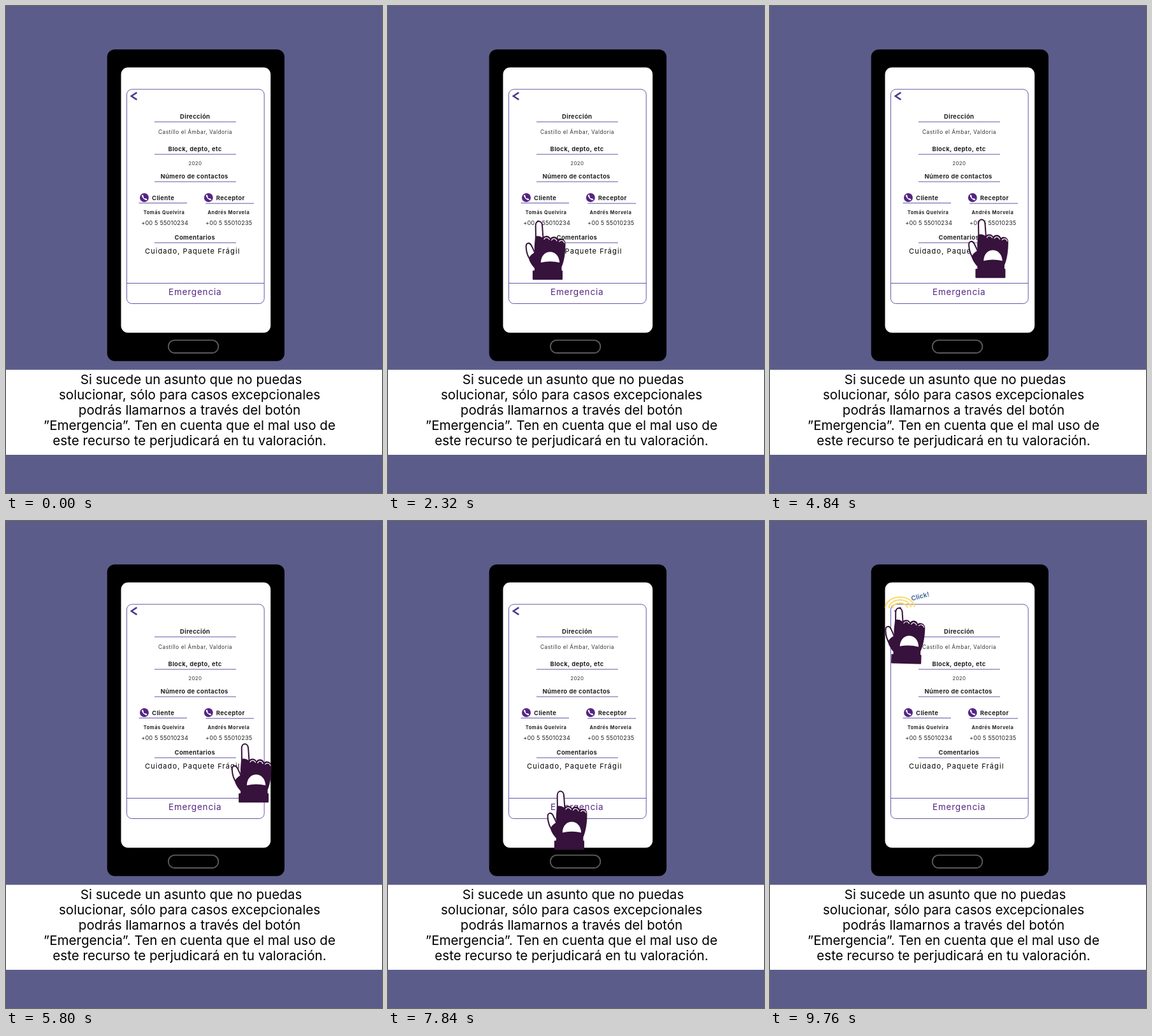
An HTML page with a canvas for the animation above (10000 ms loop, 590 by 765 pixels).

```html
<!DOCTYPE html>
<html lang="es">
<head>
<meta charset="utf-8">
<title>Botón de emergencia</title>
<style>
html, body { margin: 0; width: 100%; height: 100%; overflow: hidden; background: #5b5c8a; }
canvas { display: block; }
</style>
</head>
<body>
<canvas id="stage" width="590" height="765"></canvas>
<script>
const ctx = document.getElementById('stage').getContext('2d');
const LOOP = 10000, STEP = 40, TAP = 9480;
const DARK = '#37123c', LINE = '#6456a6', PURPLE = '#552583', INK = '#222';

// Each stroke passes its points at even intervals and starts and ends at rest
const strokes = [
  { from: 40, to: 1920, points: [[590, 396], [360, 345], [231, 309], [228, 318], [226, 331]] },
  { from: 2120, to: 4080, points: [[226, 331], [197, 349], [221, 352], [262, 344], [330, 311]] },
  { from: 4320, to: 5240, points: [[330, 311], [298, 350]] },
  { from: 5300, to: 8640, points: [[298, 350], [364, 349], [220, 393], [315, 402], [242, 430], [310, 469]] },
  { from: 8680, to: TAP, points: [[310, 469], [181, 147]] },
  { from: TAP, to: 9760, points: [[181, 147], [180, 131]] }
];

const clamp = (v) => Math.min(1, Math.max(0, v));

// Flat at turning points, so the curve never overshoots a point
function slope(before, here, after) {
  const a = here - before, b = after - here;
  return a * b <= 0 ? 0 : 2 * a * b / (a + b);
}

function handAt(t) {
  const { from, to, points } = strokes.findLast(s => t >= s.from);
  const last = points.length - 1;
  const pos = clamp((t - from) / (to - from)) * last;
  const i = Math.min(last - 1, Math.floor(pos));
  const u = pos - i;
  const point = (k) => points[Math.min(last, Math.max(0, k))];
  return [0, 1].map(axis => {
    const [o, p, q, r] = [-1, 0, 1, 2].map(k => point(i + k)[axis]);
    return p + (q - p) * u * u * (3 - 2 * u)
      + u * (1 - u) * ((1 - u) * slope(o, p, q) - u * slope(p, q, r));
  });
}

function box(x, y, w, h, r, fill, stroke, width = 1) {
  ctx.beginPath();
  ctx.roundRect(x, y, w, h, r);
  if (fill) { ctx.fillStyle = fill; ctx.fill(); }
  if (stroke) { ctx.strokeStyle = stroke; ctx.lineWidth = width; ctx.stroke(); }
}

function rule(x1, x2, y) {
  ctx.fillStyle = LINE;
  ctx.fillRect(x1, y, x2 - x1, 1);
}

function label(text, x, y, size, weight = 400, spacing = 0, color = INK) {
  ctx.font = `${weight} ${size}px Inter, sans-serif`;
  ctx.letterSpacing = spacing + 'px';
  ctx.fillStyle = color;
  ctx.fillText(text, x, y);
}

const heading = (text, x, y) => label(text, x, y, 9.5, 700, 0.35);

function shape(d, fill, stroke, width) {
  const p = new Path2D(d);
  if (fill) { ctx.fillStyle = fill; ctx.fill(p); }
  if (stroke) { ctx.strokeStyle = stroke; ctx.lineWidth = width; ctx.stroke(p); }
}

function callIcon(x, y) {
  ctx.save();
  ctx.translate(x, y);
  ctx.beginPath();
  ctx.arc(0, 0, 7, 0, 7);
  ctx.fillStyle = PURPLE;
  ctx.fill();
  ctx.lineCap = 'round';
  shape('M-2.6 -2.6 Q-2 1.8 2.6 2.8', null, '#fff', 1.4);
  shape('M-2.9 -3.2 L-2.3 -1.8 M1.8 2.4 L3.2 3', null, '#fff', 2.3);
  ctx.restore();
}

function contact(x, role, name, phone) {
  callIcon(x, 301);
  heading(role, x + 12, 305);
  label(name, x - 1.3, 327, 7.4, 700, 0.6);
  label(phone, x - 4.8, 343.6, 9.2, 400, 0.15);
}

function drawPhone() {
  box(158.7, 68.2, 278.3, 489.5, 12, '#000');
  box(180.5, 96.5, 234.7, 416.7, 11, '#fff');
  box(254.8, 524.8, 78.5, 20.2, 10.1, null, '#5a5a5a', 1.8);
  box(189.5, 130.9, 215.7, 336.6, 8, null, LINE);
  rule(189.5, 405, 435);

  ctx.lineCap = 'butt';
  shape('M205.3 135.8 L196.8 141.5 L205.3 147.2', null, '#4b3a93', 2.6);

  heading('Dirección', 273, 177.3);
  label('Castillo el Ámbar, Valdoria', 239, 200.6, 8.3, 400, 0.5, '#333');
  heading('Block, depto, etc', 254.5, 228);
  label('2020', 286.3, 250.4, 8, 400, 0.3, '#333');
  heading('Número de contactos', 242.5, 271.3);
  heading('Comentarios', 264.5, 367.2);
  for (const y of [181.5, 232.5, 275.5, 371.4]) rule(233, 361, y);

  contact(217, 'Cliente', 'Tomás Quelvira', '+00 5 55010234');
  rule(208.5, 284, 309);
  contact(317.8, 'Receptor', 'Andrés Morvela', '+00 5 55010235');
  rule(313.3, 389, 309.6);

  label('Cuidado, Paquete Frágil', 218, 389.4, 11, 400, 1.1, '#000');
  label('Emergencia', 255, 454.2, 13.5, 400, 0.8, PURPLE);
}

function drawCaption() {
  ctx.fillStyle = '#fff';
  ctx.fillRect(0, 571.5, 590, 133.5);
  ctx.textAlign = 'center';
  [
    'Si sucede un asunto que no puedas',
    'solucionar, sólo para casos excepcionales',
    'podrás llamarnos a través del botón',
    '”Emergencia”. Ten en cuenta que el mal uso de',
    'este recurso te perjudicará en tu valoración.'
  ].forEach((line, i) => label(line, i ? 288 : 290.5, 594 + 24 * i, 20.6, 400, 0, '#000'));
  ctx.textAlign = 'left';
}

// Pressing tilts the hand and shortens the index finger
function drawHand(x, y, press) {
  ctx.save();
  ctx.translate(x + 31.5, y + 46.5);
  ctx.rotate(0.03 * press);
  ctx.translate(-31.5, -46.5);
  ctx.lineJoin = ctx.lineCap = 'round';
  const tip = 5 * press;
  shape(`M16.5 28 L16.2 ${8 + tip} C16.2 ${tip - 1.2} 26 ${tip - 1.2} 26.6 ${8 + tip} L28 28 Z`, '#fff', DARK, 2);
  shape('M1.3 43 C0.3 34 7 33.5 10 40 C12.5 45 14 48 15 51 L8 62 C3.5 56 1.8 50 1.3 43 Z', '#fff', DARK, 2);
  // Palm with three folded fingers
  shape('M15.5 25 Q21 22.5 27.5 27 C30 22.5 38 23.5 39.5 28 C42 23.5 50 24.5 51.5 30 '
    + 'C55 26.5 63 29 63 36 C63.2 50 61 64 57 73 V80 H14.5 V75 C11 71 7 66 5.5 60 '
    + 'C7 55 11 52 15 50 C13.5 42 15 34 15.5 25 Z', DARK);
  shape('M29.5 29.5 C31 26 36 26 37.8 30 M41.3 31 C43 27 47.5 27.5 49.5 32 M53.2 33 C55.5 30 60 31 61.3 35',
    null, '#fff', 1.2);
  // Back of the hand
  shape('M24.3 66 C25 43.5 52.5 43.5 53.8 66 Q39 62.5 24.3 66 Z', '#fff');
  box(11.5, 78.5, 47, 14.5, 1, DARK);
  ctx.restore();
}

function drawClick(amount) {
  if (amount <= 0) return;
  ctx.save();
  ctx.globalAlpha = amount;
  ctx.strokeStyle = '#f7da6c';
  ctx.lineWidth = 2;
  ctx.lineCap = 'butt';
  for (let i = 0; i < 3; i++) {
    ctx.beginPath();
    ctx.ellipse(204, 137, 23 - 5.6 * i, 17.5 - 4.6 * i, 0, Math.PI, Math.PI * 2 - 0.1);
    ctx.stroke();
  }
  ctx.translate(222.5, 125.5);
  ctx.rotate(-0.26);
  label('Click!', 0, 0, 10.3, 700, 0.1, '#49709f');
  ctx.restore();
}

function draw(time) {
  const t = Math.floor((time % LOOP) / STEP) * STEP;
  ctx.fillStyle = '#5b5c8a';
  ctx.fillRect(0, 0, 590, 765);
  drawPhone();
  drawCaption();
  if (t < strokes[0].from) return;
  drawClick(clamp((t - TAP) / 160));
  drawHand(...handAt(t), clamp((t - TAP) / 280));
}

const start = performance.now();
function tick() {
  draw(performance.now() - start);
  requestAnimationFrame(tick);
}
tick();
</script>
</body>
</html>
```
